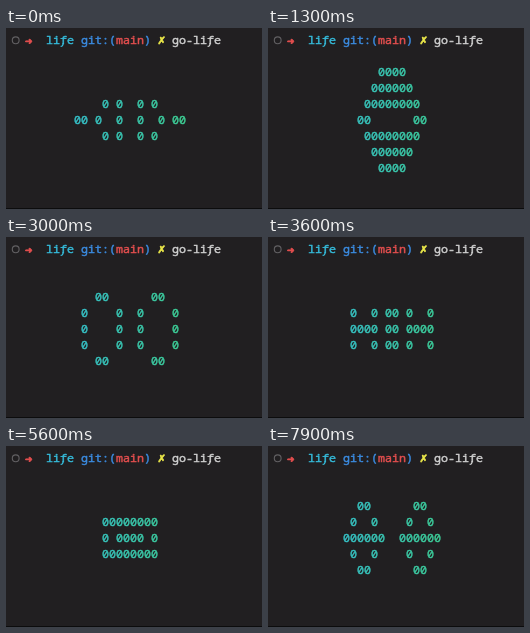
Write an HTML page with a canvas that moves like this. It is 256 px wide and 181 px high and loops after 8000 ms.

```html
<!DOCTYPE html>
<html>
<head>
<meta charset="utf-8">
<title>go-life</title>
<style>
html, body { margin: 0; width: 100%; height: 100%; overflow: hidden; background: #211f21; }
canvas { display: block; }
</style>
</head>
<body>
<canvas id="stage" width="256" height="181"></canvas>
<script>
const ctx = document.getElementById('stage').getContext('2d');
const COLS = 16, ROWS = 9, LOOP = 8000;
const MONO = '11.667px "Noto Sans Mono", monospace', SYMBOL = '"DejaVu Sans", sans-serif';
const CYAN = '#35bbda', BLUE = '#3b8be0', RED = '#e24e4e', GREY = '#cfcfcf';

// Start of each generation, in tenths of a second
const ticks = [0, 3, 6, 9, 13, 16, 20, 23, 26, 30, 33, 36, 39, 43, 46, 49, 53,
  56, 59, 63, 66, 69, 73, 76];

const blank = ' '.repeat(COLS);
const seed = Array(ROWS).fill(blank);
seed[3] = seed[5] = '    0 0  0 0    ';
seed[4] = '00 0  0  0  0 00';

const alive = (grid, r, c) => grid[r]?.[c] === '0' ? 1 : 0;

function next(grid) {
  return grid.map((row, r) => [...row].map((_, c) => {
    let sum = 0;
    for (let y = r - 1; y <= r + 1; y++)
      for (let x = c - 1; x <= c + 1; x++) sum += alive(grid, y, x);
    return sum === 3 || (sum === 4 && alive(grid, r, c)) ? '0' : ' ';
  }).join(''));
}

// Settle the pattern one full period ahead of time
const generations = [seed];
while (generations.length < 15) generations.push(next(generations.at(-1)));

// A thin outline gives the text its medium weight
function text(str, x, y, color, font = MONO, weight = 0.45) {
  ctx.font = font;
  ctx.fillStyle = ctx.strokeStyle = color;
  ctx.lineWidth = weight;
  ctx.lineJoin = 'round';
  ctx.fillText(str, x, y);
  ctx.strokeText(str, x, y);
}

// Descender on the letter f
function tail(x, color) {
  ctx.strokeStyle = color;
  ctx.lineWidth = 1.3;
  ctx.beginPath();
  ctx.moveTo(x + 3.1, 15);
  ctx.quadraticCurveTo(x + 3.1, 18.4, x + 0.6, 18.3);
  ctx.stroke();
}

function prompt() {
  ctx.strokeStyle = '#626063';
  ctx.lineWidth = 1.1;
  ctx.beginPath();
  ctx.arc(9.7, 12.3, 3.4, 0, 7);
  ctx.stroke();
  text('➜', 19, 15.5, RED, `9px ${SYMBOL}`, 0.8);
  text('life', 40, 16, CYAN);
  tail(54, CYAN);
  text('git:(', 75, 16, BLUE);
  text('main', 110, 16, RED);
  text(')', 138, 16, BLUE);
  text('✗', 151.5, 16, '#ece94a', `10px ${SYMBOL}`, 0.7);
  text('go-life', 166, 16, GREY);
  tail(201, GREY);
}

function draw(now) {
  const tenths = now % LOOP / 100;
  const gen = ticks.filter(t => t <= tenths + 0.001).length - 1;
  const grid = generations[Math.max(gen, 0) % generations.length];
  ctx.fillStyle = '#211f21';
  ctx.fillRect(0, 0, 256, 181);
  ctx.fillStyle = '#0c0c0d';
  ctx.fillRect(0, 180, 256, 1);
  prompt();
  grid.forEach((row, r) => [...row].forEach((cell, c) => {
    if (cell !== '0') return;
    const k = c / (COLS - 1);
    text('0', 68 + 7 * c, 32 + 16 * r, `rgb(${54 + 8 * k},${194 + 14 * k},${202 - 52 * k})`);
  }));
}

const start = performance.now();
function frame() {
  draw(performance.now() - start);
  requestAnimationFrame(frame);
}
frame();
</script>
</body>
</html>
```
